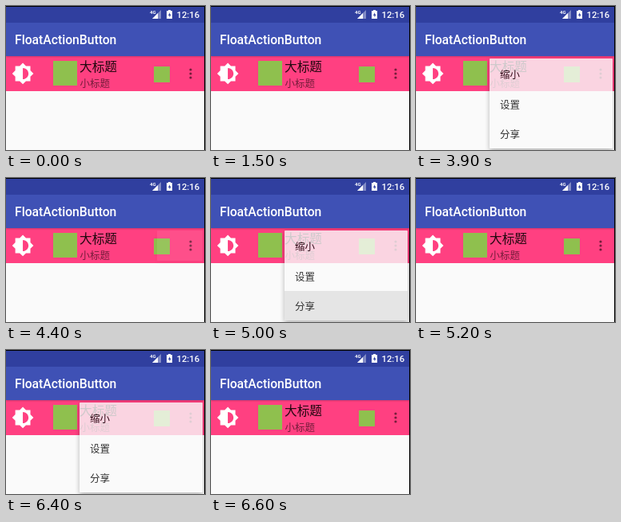
Animation of 249x181 px, one loop 7.8 s. Source, as an HTML page:

```html
<!DOCTYPE html>
<html lang="zh">
<head>
<meta charset="utf-8">
<style>
html, body { margin: 0; width: 100%; height: 100%; overflow: hidden; }
#stage { position: relative; width: 249px; height: 181px; overflow: hidden; background: #fafafa; }
#stage div, #stage svg { position: absolute; }
.text { white-space: nowrap; line-height: 20px; }
.latin { font-family: Roboto, sans-serif; font-weight: 500; color: #fff; }
.cjk { font-family: "Noto Sans CJK SC", "Noto Sans CJK", sans-serif; }
.status { left: 0; top: 0; width: 249px; height: 21px; background: #303f9f; }
.bar { left: 0; top: 21px; width: 249px; height: 42px; background: #3f51b5; box-shadow: 0 1px 2px rgba(0,0,0,.2); }
.tool { left: 0; top: 63px; width: 249px; height: 44px; background: #ff4081; }
.frame { left: 0; top: 0; width: 248px; height: 180px; border: solid #000; border-width: 1px 1px 0 0; }
.icon { background: #8fc04e; }
#popup { top: 66px; overflow: hidden; background: #fafafa; border-radius: 1px; box-shadow: 0 3px 6px rgba(0,0,0,.35); }
#list { top: 0; width: 154px; height: 113px; }
.row { left: 0; width: 154px; height: 37.5px; }
.row .text { left: 13px; top: 9px; font-size: 12.5px; color: #000; }
</style>
</head>
<body>
<div id="stage">
  <div class="tool"></div>
  <div class="bar"></div>
  <div class="status"></div>
  <div class="text latin" style="left:11px;top:33px;font-size:15.7px">FloatActionButton</div>
  <div class="text latin" style="left:213.5px;top:2px;font-size:11.3px">12:16</div>
  <div class="text latin" style="left:180px;top:-2px;font-size:6px;font-weight:700">4G</div>
  <svg width="249" height="181" style="left:0;top:0">
    <path d="M194 5V16H183Z" fill="#fff" fill-opacity=".4"/>
    <path d="M190 9V16H183Z" fill="#fff"/>
    <path d="M203 5h3v1h2v10h-7V6h2Z" fill="#fff"/>
    <path d="M205 8l-2 4h1.5v2.5l2-4H205Z" fill="#303f9f"/>
    <path transform="translate(6.9 70.8) scale(1.18)" fill="#fff" d="M20 15.31L23.31 12 20 8.69V4h-4.69L12 .69 8.69 4H4v4.69L.69 12 4 15.31V20h4.69L12 23.31 15.31 20H20zM12 18V6c3.31 0 6 2.69 6 6s-2.69 6-6 6z"/>
    <g fill="#751d3b"><circle cx="231" cy="80" r="1.6"/><circle cx="231" cy="85" r="1.6"/><circle cx="231" cy="90" r="1.6"/></g>
  </svg>
  <div class="icon" style="left:59px;top:69px;width:30px;height:31px"></div>
  <div class="icon" style="left:185px;top:76px;width:20px;height:20px"></div>
  <div class="text cjk" style="left:92px;top:66px;font-size:15.7px;color:#21080f">大标题</div>
  <div class="text cjk" style="left:92.5px;top:87px;font-size:12.5px;color:#751d3b">小标题</div>
  <div id="popup"><div id="list"></div></div>
  <div class="frame"></div>
</div>
<script>
const LOOP = 7800, RIGHT = 245.5, TOP = 66, ROW = 37.5;
const popup = document.getElementById("popup");
const list = document.getElementById("list");

const rows = ["缩小", "设置", "分享"].map((label, i) => {
  const row = document.createElement("div");
  row.className = "row";
  row.style.top = 1 + i * ROW + "px";
  row.innerHTML = `<div class="text cjk">${label}</div>`;
  list.append(row);
  return row;
});

// Popup pose: left, bottom, content shift x, shift y, opacity
const START = [189, 104, 50, -38, .08];
const GROW = [145, 131, 28, -22, .6];
const WIDE = [115, 158, 12, -11, 1];
const NEAR = [97, 174, 3, -2, 1];
const FULL = [92, 179, 0, 0, 1];
const fade = alpha => [92, 179, 0, 0, alpha];

const steps = [];
const run = (at, ...poses) => poses.forEach((pose, i) => steps.push([at + i * 100, pose]));
const close = at => run(at, fade(.8), fade(.3), fade(0));
run(0, fade(0));
run(2900, START, GROW, WIDE, NEAR, FULL);
close(3900);
run(4400, START, WIDE, FULL);
close(5000);
run(5500, START, WIDE, FULL);
close(6400);

function draw(t) {
  const [left, bottom, dx, dy, alpha] = steps.findLast(([at]) => at <= t)[1];
  popup.style.left = left + "px";
  popup.style.width = RIGHT - left + "px";
  popup.style.height = bottom - TOP + "px";
  popup.style.opacity = alpha;
  list.style.left = 92 - left + dx + "px";
  list.style.top = dy + "px";
  rows[2].style.background = t >= 5000 && t < 5200 ? "#e0e0e0" : "none";
}

const begin = performance.now();
function tick() {
  draw((performance.now() - begin) % LOOP);
  requestAnimationFrame(tick);
}
tick();
</script>
</body>
</html>
```
